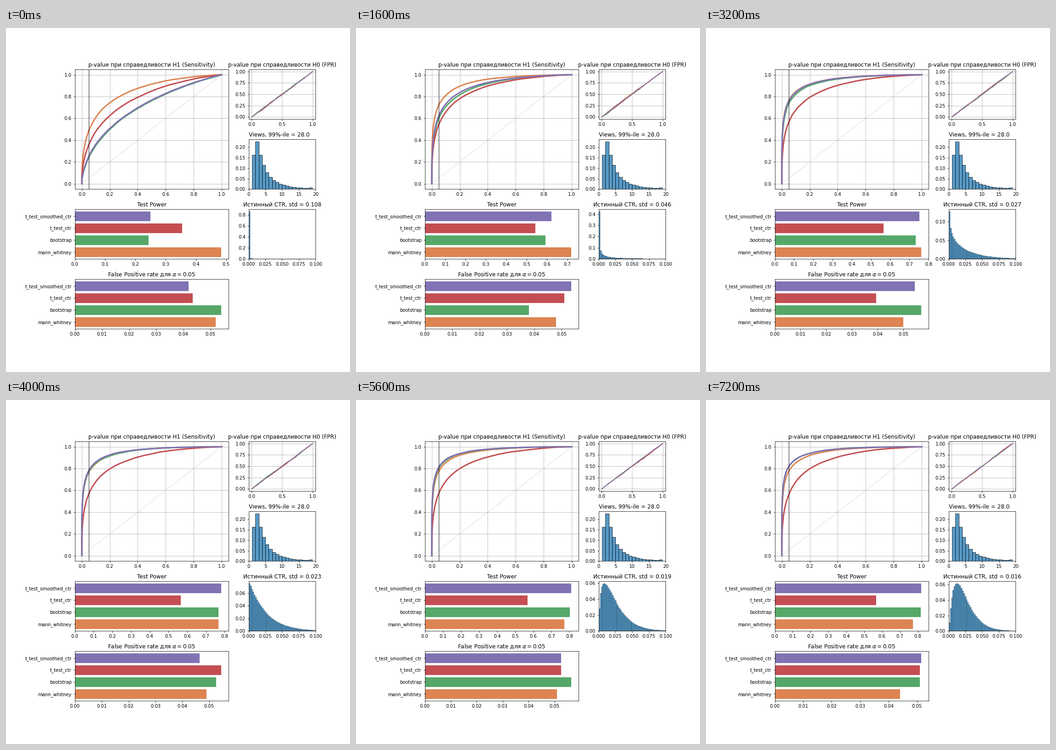
A matplotlib script that plays this animation: 748 by 748 pixels, repeating every 8 s.

```python
import math

import matplotlib.pyplot as plt
import numpy as np
from matplotlib.animation import FuncAnimation

SIZE, DPI = 748, 72
STEPS, STEP_MS = 10, 800
ALPHA = 0.05
SAMPLES = 2000
CTR_MEAN = 0.024
MAX_VIEWS = 19

# name, colour, first power, final power, approach rate per step
TESTS = [
    ("mann_whitney", "#DD8452", 0.484, 0.772, 0.85),
    ("bootstrap", "#55A868", 0.2435, 0.825, 0.46),
    ("t_test_ctr", "#C44E52", 0.355, 0.568, 1.05),
    ("t_test_smoothed_ctr", "#8172B3", 0.25, 0.825, 0.52),
]
NAMES = [test[0] for test in TESTS]
COLORS = [test[1] for test in TESTS]

Z = np.linspace(-6, 6, 700)
PHI = np.array([0.5 * (1 + math.erf(z / math.sqrt(2))) for z in Z])
RANKS = (np.arange(SAMPLES) + 0.5) / SAMPLES
CTR_BINS = np.linspace(0, 0.104, 53)


def powers(step):
    return [end - (end - start) * math.exp(-rate * step)
            for _, _, start, end, rate in TESTS]


def power_curve(power, step, rng):
    """Binormal curve through (ALPHA, power) with slight sampling noise."""
    slope = 0.82 + 0.04 * math.exp(-step)
    shift = np.interp(power, PHI, Z) - slope * np.interp(ALPHA, PHI, Z)
    y = np.interp(shift + slope * Z, Z, PHI)
    noise = np.sort(rng.random(SAMPLES)) - RANKS
    y = np.clip(y + 0.3 * np.interp(y, RANKS, noise), 0, 1)
    return np.r_[0, PHI, 1], np.r_[0, np.maximum.accumulate(y), 1]


def view_shares():
    """Rounded-up lognormal(1, 1) counts, cut at MAX_VIEWS."""
    cdf = np.interp(np.log(np.arange(1, MAX_VIEWS + 1)) - 1, Z, PHI)
    shares = np.diff(cdf, prepend=0) / cdf[-1]
    return np.append(shares[:-2], shares[-2:].sum())


def beta_shares(total):
    """Bin probabilities of a beta law with mean CTR_MEAN and a + b = total."""
    a, b = CTR_MEAN * total, (1 - CTR_MEAN) * total
    coef, series = 1.0, np.zeros_like(CTR_BINS)
    for n in range(80):
        series += coef * CTR_BINS**n / (a + n)
        coef *= (n + 1 - b) / (n + 1)
    log_beta = math.lgamma(a) + math.lgamma(b) - math.lgamma(total)
    return np.diff(CTR_BINS**a * series / math.exp(log_beta))


def bar_panel(spec, title):
    ax = fig.add_subplot(spec)
    ax.set_title(title)
    return ax, ax.barh(NAMES, np.ones(len(NAMES)), color=COLORS)


def curve_panel(spec, title, width):
    ax = fig.add_subplot(spec)
    ax.set_title(title)
    ax.grid(True)
    ax.set(xlim=(-0.05, 1.05), ylim=(-0.05, 1.05))
    return ax, [ax.plot([], [], color=c, lw=width)[0] for c in COLORS]


def hist_panel(spec, edges, heights, edge_width):
    ax = fig.add_subplot(spec)
    bars = ax.bar(edges[:-1], heights, np.diff(edges), align="edge",
                  facecolor=(0.122, 0.467, 0.706, 0.75),
                  edgecolor="black", linewidth=edge_width)
    return ax, bars


fig = plt.figure(figsize=(SIZE / DPI, SIZE / DPI), dpi=DPI, facecolor="white")
grid = fig.add_gridspec(4, 3, left=0.2, right=0.9, top=0.88, bottom=0.125,
                        wspace=0.3, hspace=0.4)

h1_ax, h1_lines = curve_panel(
    grid[:2, :2], "p-value при справедливости H1 (Sensitivity)", 3)
h1_ax.plot([0, 1], [0, 1], color="black", alpha=0.15, lw=0.9, zorder=1.9)
h1_ax.axvline(ALPHA, color="black", lw=0.9)

h0_ax, h0_lines = curve_panel(
    grid[0, 2], "p-value при справедливости H0 (FPR)", 1.5)

views = view_shares()
views_ax, _ = hist_panel(grid[1, 2], np.arange(1, MAX_VIEWS + 1), views, 0.73)
views_ax.set(xlim=(0, 20), ylim=(0, 1.05 * views.max()))
views_p99 = math.ceil(math.exp(1 + np.interp(0.99, PHI, Z)))
views_ax.set_title(f"Views, 99%-ile = {views_p99:.1f}", x=0.459)

ctr_ax, ctr_bars = hist_panel(
    grid[2, 2], CTR_BINS, np.zeros(len(CTR_BINS) - 1), 0.29)
ctr_ax.set_xlim(0, 0.1)

power_ax, power_bars = bar_panel(grid[2, :2], "Test Power")
fp_ax, fp_bars = bar_panel(
    grid[3, :2], r"False Positive rate для $\alpha = 0.05$")


def set_bars(ax, bars, values):
    for bar, value in zip(bars, values):
        bar.set_width(value)
    ax.set_xlim(0, 1.05 * max(values))


def update(step):
    rng = np.random.default_rng(100 + step)
    step_powers = powers(step)
    for line, power in zip(h1_lines, step_powers):
        line.set_data(*power_curve(power, step, rng))
    set_bars(power_ax, power_bars, step_powers)

    null_values = np.sort(rng.random((len(TESTS), SAMPLES)))
    for line, values in zip(h0_lines, null_values):
        line.set_data(values, RANKS)
    set_bars(fp_ax, fp_bars, (null_values < ALPHA).mean(axis=1))

    total = np.interp(step, [0, 1, 2, STEPS - 1], [1, 5, 10, 86])
    std = math.sqrt(CTR_MEAN * (1 - CTR_MEAN) / (total + 1))
    shares = beta_shares(total)
    for bar, share in zip(ctr_bars, shares):
        bar.set_height(share)
    ctr_ax.set_ylim(0, 1.05 * shares.max())
    ctr_ax.set_title(f"Истинный CTR, std = {std:.3f}")


anim = FuncAnimation(fig, update, frames=STEPS, interval=STEP_MS,
                     init_func=lambda: update(0), repeat=True, repeat_delay=0)
plt.show()
```
